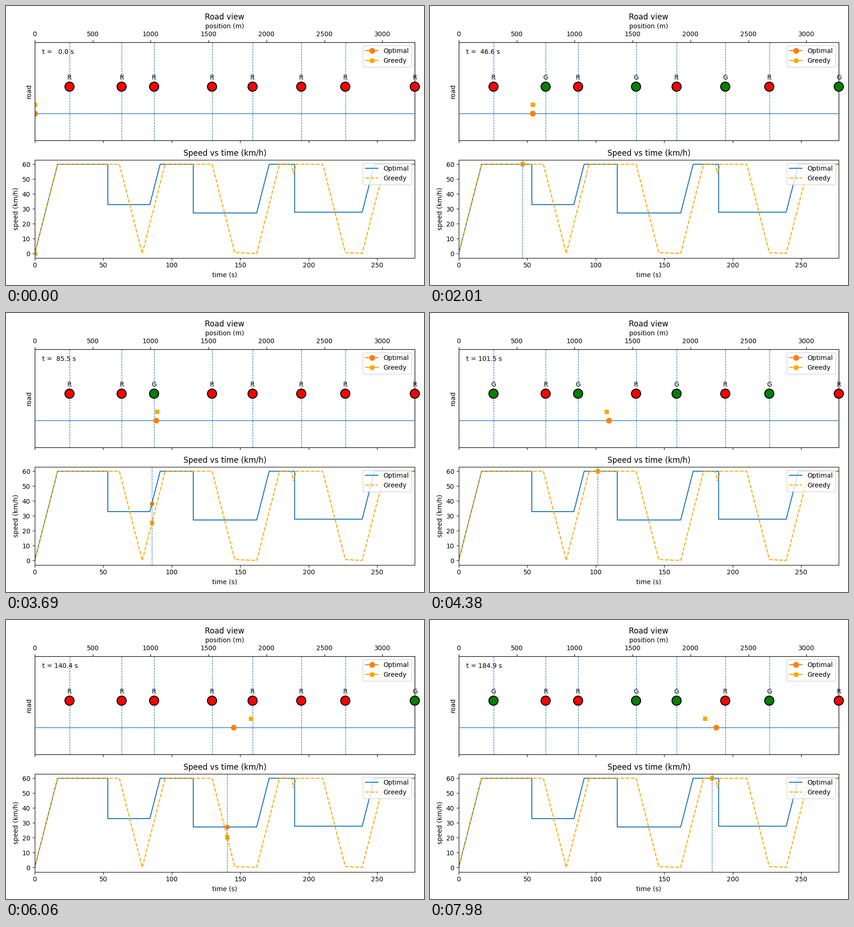
Recreate the animation shown at these times as a matplotlib script. Size 900 by 600 pixels, loop 8 s.

```python
import numpy as np
import matplotlib.pyplot as plt
from matplotlib.animation import FuncAnimation

LOOP_MS = 8000
FRAMES = 267
STEPS = 400                     # time samples over the whole trip
VMAX = 60 / 3.6                 # m/s
ACC = 1.0                       # m/s^2
RAMP = VMAX / ACC               # seconds from standstill to full speed
BRAKE = VMAX ** 2 / (2 * ACC)   # metres from full speed to standstill

# traffic lights: position (m), cycle (s); every other one starts a phase later
SPOTS = [300, 750, 1030, 1530, 1880, 2300, 2680, 3280]
CYCLES = [75, 75, 70, 69, 74, 75, 75, 78]
GREEN = 25
LIGHTS = [(pos, 14 + GREEN * (k % 2), cycle)
          for k, (pos, cycle) in enumerate(zip(SPOTS, CYCLES))]
ROAD = SPOTS[-1]
ROLL = 6                        # roll on if green is this close (s)
CREEP = 0.6 / 3.6


def is_green(t, first, cycle):
    return t >= first and (t - first) % cycle < GREEN


def next_green(t, first, cycle):
    return first + cycle * max(0, np.ceil((t - first) / cycle))


def optimal_profile():
    """Glide between two lights whenever full speed would meet red."""
    knots = [(0, 0), (RAMP, VMAX)]
    t, x, last = RAMP, BRAKE, 0
    for pos, first, cycle in LIGHTS:
        arrive = t + (pos - x) / VMAX
        if is_green(arrive, first, cycle):
            t, x = arrive, pos
        else:
            # the glide starts at the previous light, after any ramp
            goal = next_green(arrive, first, cycle)
            slow = (pos - last) / (goal - t)
            end = goal + (VMAX - slow) / ACC
            knots += [(t, VMAX), (t, slow), (goal, slow), (end, VMAX)]
            t, x = end, pos + (VMAX ** 2 - slow ** 2) / (2 * ACC)
        last = pos
    knots.append((t, VMAX))
    return np.array(knots, float).T


def greedy_profile(end):
    """Full speed; brake at the last moment for a red light."""
    knots = [(0, 0), (RAMP, VMAX)]
    t, x = RAMP, BRAKE
    for pos, first, cycle in LIGHTS:
        brake = t + (pos - BRAKE - x) / VMAX
        if is_green(brake, first, cycle):
            continue
        go, stop = next_green(brake, first, cycle), brake + RAMP
        knots.append((brake, VMAX))
        if go - stop > ROLL:
            knots.append((stop - CREEP / ACC, CREEP))
        else:
            go = min(go, stop)
        low = max(0, VMAX - ACC * (go - brake))
        t = go + (VMAX - low) / ACC
        knots += [(go, low), (t, VMAX)]
        x = pos - BRAKE + (VMAX ** 2 - low ** 2) / ACC
    knots.append((end, VMAX))
    return np.array(knots, float).T


def travelled(t, times, speeds):
    """Exact distance under a piecewise linear speed."""
    inner = times < t
    ts = np.append(times[inner], t)
    vs = np.append(speeds[inner], np.interp(t, times, speeds))
    return float(np.sum(np.diff(ts) * (vs[1:] + vs[:-1]) / 2))


opt_t, opt_v = optimal_profile()
TOTAL = opt_t[-1]
grd_t, grd_v = greedy_profile(TOTAL)

fig, (base, speed) = plt.subplots(2, 1, figsize=(9, 6), dpi=100, sharex=True)

# road view
road = base.twiny()
base.set_yticks([])
base.set_ylabel("road")
road.set_xlim(0, ROAD)
road.set_ylim(-0.6, 1.6)
road.set_xlabel("position (m)")
road.set_title("Road view")
road.axhline(0, lw=1)

for pos in SPOTS:
    road.axvline(pos, ls="--", lw=0.8)
lamps = road.scatter(SPOTS, [0.6] * len(SPOTS), s=200, c="red",
                     edgecolors="black", linewidths=1.5,
                     clip_on=False, zorder=3)
lamps.set_in_layout(False)
letters = [road.text(pos, 0.8, "R", ha="center", va="center")
           for pos in SPOTS]

opt_car, = road.plot([0], [0], "o-", color="C1", ms=8, label="Optimal")
grd_car, = road.plot([0], [0.2], "s-", color="orange", ms=6, label="Greedy")
clock = road.text(0.02, 0.9, "", transform=road.transAxes, va="center")
road.legend(loc="upper right")

# speed chart
speed.plot(opt_t, opt_v * 3.6, color="C0", label="Optimal")
speed.plot(grd_t, grd_v * 3.6, "--", color="orange", label="Greedy")
opt_dot, = speed.plot([0], [0], "o", color="C1", ms=6)
grd_dot, = speed.plot([0], [0], "s", color="orange", ms=6)
cursor = speed.axvline(0, ls="--", lw=0.8)
speed.set_xlim(0, TOTAL)
speed.set_ylim(-3, 63)
speed.set_xlabel("time (s)")
speed.set_ylabel("speed (km/h)")
speed.set_title("Speed vs time (km/h)")
speed.legend(loc="upper right")

fig.tight_layout()


def update(i):
    t = TOTAL * i / (STEPS - 1)
    clock.set_text(f"t = {t:5.1f} s")
    states = [is_green(t, first, cycle) for _, first, cycle in LIGHTS]
    lamps.set_facecolor(["green" if go else "red" for go in states])
    for letter, go in zip(letters, states):
        letter.set_text("G" if go else "R")
    opt_car.set_xdata([travelled(t, opt_t, opt_v)])
    grd_car.set_xdata([travelled(t, grd_t, grd_v)])
    opt_dot.set_data([t], [np.interp(t, opt_t, opt_v) * 3.6])
    grd_dot.set_data([t], [np.interp(t, grd_t, grd_v) * 3.6])
    cursor.set_xdata([t, t])
    return [clock, lamps, opt_car, grd_car, opt_dot, grd_dot, cursor,
            *letters]


anim = FuncAnimation(fig, update, frames=FRAMES, interval=LOOP_MS / FRAMES,
                     init_func=lambda: update(0), repeat=True, repeat_delay=0)
plt.show()
```
